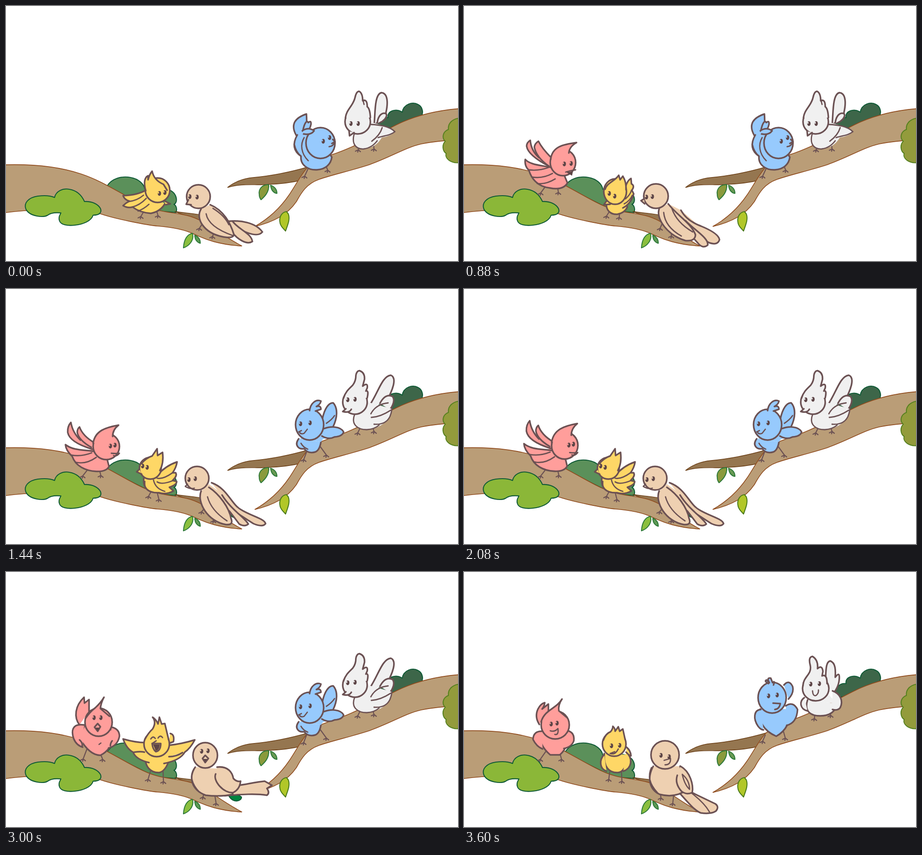
An HTML page that plays this animation: 996 by 562 pixels, repeating every 3.72 s.

```html
<!DOCTYPE html>
<html lang="en">
<head>
<meta charset="utf-8">
<title>Birds on a branch</title>
<style>
html,body{margin:0;width:100%;height:100%;overflow:hidden;background:#fff}
svg{display:block;width:100vw;height:100vh}
.bird{stroke:#6b5153;stroke-width:3.5;stroke-linecap:round;stroke-linejoin:round}
.bird .line{fill:none}
.bird .leg{fill:none;stroke-width:2.3}
.bird .dark{fill:#5d4547;stroke:none}
.bird .flat{stroke:none}
.bird .thin{stroke-width:2.8}
.wood{fill:#ba9d77;stroke:#8f4a1c;stroke-width:1.6}
.shade{fill:#957650;stroke:#6b3f17;stroke-width:1.4}
.leaf{stroke:#0f5a36;stroke-width:2.1;stroke-linejoin:round}
</style>
</head>
<body>
<svg id="stage" viewBox="0 0 996 562">
  <g class="leaf">
    <path fill="#5b905a" d="M222 398C232 380 255 374 275 378C292 381 304 392 306 404C330 396 362 400 372 415C378 425 376 435 370 437C376 440 377 448 375 455L330 452Z"/>
    <path fill="#3d6649" d="M815 275C820 252 828 244 842 246C838 232 860 224 873 234C876 216 896 210 908 217C919 223 920 236 915 244L860 275Z"/>
    <path fill="#00843f" d="M490 491C500 488 512 490 519 496C519 503 510 506 503 504Q494 501 490 491Z"/>
  </g>
  <path class="shade" d="M372 453C400 457 430 458 450 466Q470 474 482 486Q440 480 412 468Z"/>
  <path class="shade" d="M668 354C630 365 590 374 545 378C520 380 500 390 488 400C520 390 550 396 580 393C610 392 635 388 655 383Z"/>
  <path class="wood" d="M-5 350C60 348 120 355 165 370S240 406 290 432S360 452 400 462S465 500 520 529C470 526 440 515 415 503S360 487 335 485S240 469 208 458C150 450 60 446 -5 456Z"/>
  <path class="wood" d="M1000 226C950 230 900 242 860 262S770 310 720 327S680 345 664 356C650 372 638 395 624 416C605 444 580 468 548 486C590 476 620 460 640 431C651 411 662 392 690 382C715 373 760 363 800 350C850 332 880 312 915 304C945 298 975 296 1000 295Z"/>
  <g class="leaf">
    <path fill="#8bb738" d="M107 422C110 408 125 401 140 404C158 407 168 420 173 431C190 430 203 437 208 446C212 455 206 461 192 461C188 474 170 481 152 483C135 485 121 482 118 474C115 466 118 462 121 456C110 455 98 456 92 461C82 467 52 464 44 448C38 434 50 422 70 419C85 417 98 418 107 422Z"/>
    <path fill="#939b3c" stroke="#56801f" d="M1000 247C985 248 973 258 975 272C962 277 960 291 968 298C960 306 962 320 970 325C966 335 980 348 1000 345Z"/>
    <path fill="#8a9a3c" stroke="#2f7a3a" d="M579 394C565 393 556 403 558 415Q558 422 562 427C570 420 580 410 579 394Z"/>
    <path fill="#6b9b55" stroke="#2f7a3a" d="M583 395Q597 400 597 413Q585 411 583 395Z"/>
    <path fill="#b1c728" stroke="#4b7a1c" d="M618 453C606 455 601 467 604 479C606 487 612 491 616 496C620 484 627 470 622 458Z"/>
    <path fill="#8bbf3f" stroke="#2f7a3a" d="M411 501C399 503 392 515 391 533C403 529 415 517 411 501Z"/>
    <path fill="#5f9a55" stroke="#2f7a3a" d="M416 505Q429 511 428 523Q416 519 416 505Z"/>
  </g>
</svg>
<script>
// Pose parts: l leg, b filled outline, f flat fill, s line, k dark, h head, e eye, c closed eye
const birds = [
  { fill: '#f0f0f0', foot: 316,
    keys: [[1160, 1240, 1], [3160, 3360, 2]],
    poses: [
`l779 312 776 317|l810 306 811 315
bM811 262C814 240 811 195 827 191C842 192 842 215 837 236C833 246 822 256 811 262
bM818 258C820 240 830 233 838 238C841 245 832 254 822 258
fM768 276C758 300 768 316 788 315Q815 313 828 290Q848 287 857 277Q840 264 803 256Z
sM769 277C760 300 768 316 788 315Q806 313 818 297
sM803 261C825 262 845 265 857 277C845 286 835 285 820 290M829 268Q824 285 806 298
h775 255 28 27
bM748 246C750 228 765 220 769 202Q772 188 778 188Q786 192 786 209Q796 204 796 222Q802 226 803 246
sM787 209L789 217
bM756 276L757 286L767 279|e760 259|e776 259`,
`l780 307 775 317|l808 305 811 314
bM800 258C820 230 828 192 848 190C862 196 853 222 836 252
bM824 252Q836 229 852 237Q859 248 846 266
fM768 277C760 298 774 310 795 310C825 309 850 286 850 264L800 250Z
sM768 277C760 298 774 310 795 310Q812 309 822 300
sM811 298Q837 300 846 281Q851 268 850 262
sM805 283Q825 282 848 267M804 275Q815 254 842 251
h769 249 27 27
bM744 240C748 226 757 219 764 212Q771 203 771 190Q773 180 779 180Q791 184 790 199L786 214Q798 205 796 218L793 225Q800 222 796 240
bM749 264L742 270Q756 274 761 265|e753 244|e769 243`,
`l773 315 772 323|l807 311 808 316
bM796 245C798 220 796 198 807 196C819 200 819 217 818 232Q828 218 827 235Q826 252 815 266
fM757 282L800 266L821 290Z
bM757 282C750 304 760 317 785 317C805 317 820 308 821 290
bM750 277C738 284 740 303 757 306
bM812 262C830 268 836 285 829 299Q824 306 812 303
h775 257 29 27
bM747 250C748 230 767 226 763 206Q758 187 768 186Q781 194 779 213Q789 204 791 219L789 229Q800 224 800 246
sM768 262Q769 275 776 272Q782 267 781 260|e764 247|e783 246`] },

  { fill: '#97cafd', foot: 366,
    keys: [[960, 1120, 1], [3040, 3200, 2]],
    poses: [
`l665 360 658 375|l704 350 709 362
bM640 286C628 265 632 248 662 238C663 252 664 268 654 287
bM642 284C630 305 634 320 650 331C648 350 665 362 685 361C705 360 716 348 718 333L680 282
sM657 290C648 305 650 325 666 341M636 307Q639 321 650 331
h693 302 32 34
bM654 276C658 254 664 252 666 257Q673 251 672 261Q670 272 660 281
bM653 275Q666 266 679 275Q672 285 656 282
bM720 294L725 299L718 303|sM712 310Q721 309 723 302|e699 298|e713 290`,
`l662 360 656 376|l693 348 706 366
fM697 287L721 300L712 325L690 335Z
bM697 287C702 262 712 250 721 251C732 263 730 284 721 303
bM645 330C634 345 646 354 657 352Q666 364 682 359Q691 355 694 337
fM645 330L694 337L706 320Z
bM700 308C715 302 737 302 744 315Q741 325 724 326Q711 333 696 324
sM706 296Q718 288 724 279M650 340Q655 349 665 353
h669 299 31 34
bM669 268C671 251 684 242 694 247Q693 254 684 259Q694 256 694 265L682 269
sM647 316Q650 321 657 318L664 309M645 315L651 312|e649 297|e670 295`,
`l664 359 658 373|l703 348 708 366
bM705 249Q716 236 724 252Q728 266 715 280
bM653 302C646 326 660 350 688 362C708 351 720 332 718 302
bM654 303C638 304 637 324 648 340Q654 348 660 348
bM709 295Q725 284 735 303C734 320 728 334 711 338
h679 277 31 34
bM671 246Q660 240 667 238L673 244Q666 232 676 234L680 244Q686 238 682 249
bM681 289L697 290Q695 302 685 303|e671 273|e690 271`] },

  { fill: '#eed0b1', foot: 504,
    keys: [[40, 360, 1], [680, 840, 2], [1040, 1240, 3], [2680, 2960, 4], [3160, 3400, 5]],
    poses: [
`l432 481 426 490|l459 498 455 508
fM480 470L520 476L535 500L498 498Z
bM487 475C515 471 550 477 565 498C557 508 538 504 515 492
bM499 474C510 491 541 501 543 519C530 528 508 512 498 498
bM430 447C416 470 438 500 475 508Q502 514 502 503C495 480 480 450 450 438
sM441 458Q446 487 500 506M456 446Q482 462 491 482
h424 420 26 26|bM402 427L397 437L408 438|e405 420|e421 421`,
`l435 482 431 490|l456 496 457 507
fM490 475L530 495L530 520L502 502Z
bM496 478C518 484 552 505 558 518Q553 526 541 522Q538 515 522 502
bM506 484C527 500 542 520 539 531Q529 540 519 528L504 502
bM430 446C421 470 450 506 490 517Q510 516 506 504C502 482 478 450 450 432
sM442 461Q447 490 482 506M464 441Q491 459 499 486
h422 419 27 27|bM397 425L389 429L396 437|e401 419|e414 419`,
`l436 481 432 490|l457 495 457 507
fM478 450L515 482L530 515L500 500L450 436Z
bM478 450Q490 473 522 485Q561 501 563 515Q559 528 541 522L500 500
bM488 473C508 494 540 512 537 527Q526 536 515 522L496 501
bM430 447C422 470 450 506 488 517Q510 519 510 504C500 478 470 462 450 436
sM440 455Q443 487 479 507M458 446Q468 477 504 498
h423 419 27 27|bM397 425L390 429L398 436|e402 421|e415 420`,
`l436 485 431 491|l460 499 457 511
fM447 430L490 462L535 510L520 512L492 489L470 500L430 445Z
bM453 427C489 440 496 475 519 487C540 500 569 506 572 517Q566 526 545 517L500 488
bM476 454C494 484 527 505 534 518Q526 525 514 518L492 489
bM430 445C420 470 444 512 484 519Q502 521 496 506C492 482 470 452 447 437
sM444 458Q452 488 487 511
h421 417 26 26|sM400 430L395 435Q406 442 415 439|e403 420|e417 418`,
`l437 485 434 496|l460 491 463 510
bM492 473C522 470 548 463 570 461L586 470L575 477Q582 487 575 492C550 488 520 490 482 493
bM417 430C402 452 408 480 440 492Q472 496 500 490L475 434
sM414 434Q400 457 426 485
bM465 430C490 427 499 443 501 455Q508 463 517 461Q515 479 501 486C480 489 455 460 462 445
h439 404 27 28|bM433 411L439 404L446 411L439 420Z|kM435 412H444L439 418Z|e431 395|e445 394`,
`l433 489 434 498|l462 491 460 510
bM474 486C492 506 508 526 522 531Q544 534 555 527Q563 518 554 511L500 485
sM501 487Q529 508 541 529
bM417 428C402 456 410 480 431 490Q466 499 491 480L476 428
sM413 431Q400 458 426 486
bM477 428C499 440 506 470 503 486Q490 492 479 483Q464 466 470 448
sM481 446Q497 459 497 479Q486 469 481 446
h443 403 31 31|sM441 415L455 411Q456 425 443 425|e434 404|e452 407`] },

  { fill: '#fed766', foot: 463,
    keys: [[720, 840, 1], [920, 1080, 2], [2720, 2960, 3], [3080, 3280, 4]],
    poses: [
`l303 454 297 464|l332 452 335 462
bM310 405Q290 417 258 418Q261 427 272 430Q264 434 258 440Q268 446 279 443Q294 455 319 457Q340 453 350 436
sM270 431Q289 429 303 417M278 443Q295 439 309 424M291 452Q304 447 315 437
h334 406 27 27
bM308 407C303 390 305 378 313 374L313 383Q316 371 322 364Q326 384 347 393L355 406
bM348 429L362 436L352 438|e338 413|e350 411`,
`l319 455 314 463|l343 454 342 466
bM314 434C312 452 325 460 338 459Q354 456 360 443L350 420
bM353 412Q357 386 368 380L369 392Q377 396 370 406L374 414Q367 437 350 445
sM356 425Q367 415 369 406M353 436Q365 430 371 417
h333 409 25 28
bM311 404C314 390 333 386 341 373L344 383L350 375Q358 388 357 405
bM314 430L308 438L322 437|e320 413|e332 419`,
`l320 446 314 457|l333 448 337 464
bM304 414C300 438 313 450 337 449Q353 454 369 445L360 437Q377 431 376 424L367 422Q378 412 374 405L367 405Q375 394 377 381Q351 390 334 410
sM325 421Q329 440 350 446M333 417Q346 420 367 405M333 425Q343 432 366 423M306 424Q304 441 317 446
h318 395 24 24
bM297 386Q309 372 322 368L333 352L334 367L345 360Q348 384 339 400
bM294 397L288 403L299 408|e301 390|e311 393`,
`l318 440 313 457|l346 438 347 462
bM362 356Q372 358 369 374L358 378
bM307 400C304 431 320 443 338 442Q355 438 363 401
bM307 376Q286 376 258 368Q266 390 280 397Q286 413 315 420M283 397Q297 395 305 397
bM358 382Q387 379 416 370Q406 389 394 397Q384 415 348 422M359 407Q375 407 389 398
h332 379 28 28
bM306 369Q314 354 323 346Q332 331 323 320Q331 325 335 335L338 320L343 335L350 334L358 368
bM322 378H341Q341 394 330 396Q323 390 322 378Z|kM324 380H339Q338 393 330 394Z|sM322 378L331 372|c324 365|c340 363`,
`l321 441 319 457|l347 440 348 461
bM358 386Q367 393 368 405L357 408
bM309 400C307 430 320 443 339 442Q355 442 364 403
bM309 402C297 415 299 434 314 439
bM357 397C373 410 370 433 351 439
h331 379 26 27
bM307 371Q312 356 323 352Q328 346 328 340Q333 344 333 351L340 341L343 351L350 346L355 369
sM322 400Q333 404 340 390M322 400L332 396|e325 383|e343 382`] },

  { fill: '#ff9e9b', foot: 414,
    keys: [[640, 800, 1], [960, 1120, 2], [2440, 2600, 3], [2800, 2960, 4], [3000, 3120, 5]],
    poses: [
`l182 396 165 411|l206 397 206 408
fM184 354L166 328L215 350L205 385L160 364Z
bM184 354C160 346 135 318 140 298Q142 287 150 280Q160 300 166 320Q184 335 196 358
bM168 325Q165 308 174 296Q186 318 197 350
bM203 355C170 362 150 358 132 352Q134 362 147 368Q138 372 140 376C150 392 175 402 197 401C220 400 238 385 240 366
sM139 371Q165 378 194 362M152 390Q174 391 199 370M220 391Q236 386 241 372
h228 342 29 29
bM202 329C205 305 220 294 236 285C230 298 228 306 229 318
bM239 345Q252 343 256 335L257 347Q252 354 238 352L250 348|c220 334|c239 329`,
`l180 397 169 412|l206 398 208 411
fM187 353L165 325L205 340L210 385L150 362Z
bM187 353Q141 329 138 309Q138 301 146 296Q148 319 165 334
bM187 353Q159 333 155 311Q156 303 164 298Q172 314 192 334
bM193 356C170 351 145 350 135 338Q133 353 143 362C148 379 161 398 189 401Q218 407 228 390L218 366
sM142 361Q164 364 186 356M150 377Q173 381 195 369M161 391Q180 394 201 381
h218 345 28 29
bM191 338C194 310 218 305 248 301Q232 310 231 324
sM224 366Q234 363 246 361|kM225 366L240 365L238 374Z|e221 348|e236 347`,
`l180 398 169 412|l206 399 209 411
fM190 353L165 325L205 340L210 385L155 362Z
bM190 353Q140 338 136 316Q135 303 143 294Q147 317 164 333
bM188 349Q160 333 157 316Q157 308 162 304Q169 324 195 339
bM196 358C174 354 149 357 131 343Q132 356 146 369C153 390 175 401 199 402Q221 403 227 391L222 372
sM144 366Q166 370 189 361M155 382Q176 387 199 371
h221 347 29 29
bM192 340C196 312 220 305 248 300Q235 310 235 325
sM232 362Q242 363 250 362Q244 370 237 367|e230 346|e240 344`,
`l180 394 167 414|l208 394 213 412
fM180 350L173 318L200 335L215 390L160 355Z
bM180 350Q148 338 150 312Q153 294 165 286Q172 306 173 329
bM177 343Q166 308 180 295Q187 307 190 331
bM190 349C168 343 142 347 130 367Q140 362 146 365C158 382 182 397 209 398Q231 396 240 383L226 360
sM146 363Q165 367 183 352M157 371Q176 377 191 367
bM221 375Q237 369 241 382Q240 393 232 399Q233 389 225 388
h211 343 29 30
bM184 334C188 308 211 294 235 287Q218 302 219 322
bM214 356L226 364L216 371L209 365|kM211 363L224 364L215 369Z|e207 345|e222 342`,
`l178 391 170 412|l208 400 213 413
bM162 337C149 320 152 295 172 276L173 289L183 281L183 307
bM172 340L162 366Q184 404 208 404Q231 393 240 360L228 340
bM172 337C144 333 144 352 149 367Q155 382 169 386M162 370Q169 376 168 383
bM233 342Q250 346 250 362Q246 383 226 388M234 372Q230 377 230 383
sM205 380L209 377
h204 331 30 31
bM175 323Q184 309 197 299Q209 288 216 276Q209 289 208 301L228 318
bM195 342L202 334L208 341L202 351Z|kM197 343H206L202 350Z|e194 321|e209 321`,
`l182 393 168 413|l211 398 215 413
bM166 336Q155 319 163 302Q169 290 178 288Q177 296 172 302L186 291L186 306
bM168 353Q163 380 190 403H211Q228 389 232 358
bM172 351Q153 350 152 369Q160 385 173 390
bM229 350Q244 354 242 372Q237 386 220 389
h201 337 31 31
bM170 330C178 303 203 302 216 280Q207 293 209 306L227 321
sM190 350Q200 353 207 345Q209 360 200 358|e192 335|e205 333`] }
];

const pinkNods = [[1480, 2, -2], [1640, 1, -1], [1680, 0, 0], [2080, 1, -2], [2120, 2, -3], [2400, 0, 0]];
const LOOP = 3720, STEP = 40;
const stage = document.getElementById('stage');
const nums = s => s.trim().split(/[ ,]+/).map(Number);
const path = (cls, d, fill = '') => `<path class="${cls}" d="${d}"${fill && ` fill="${fill}"`}/>`;
const oval = (cls, x, y, rx, ry, fill = '') =>
  `<ellipse class="${cls}" cx="${x}" cy="${y}" rx="${rx}" ry="${ry}"${fill && ` fill="${fill}"`}/>`;

function part(token, fill) {
  const kind = token[0], d = token.slice(1), n = nums(d);
  switch (kind) {
    case 'b': return path('', d, fill);
    case 'f': return path('flat', d, fill);
    case 's': return path('line thin', d);
    case 'k': return path('dark', d);
    case 'h': return oval('', ...n, fill);
    case 'e': return oval('dark', n[0], n[1], 3.7, 5.3) + oval('flat', n[0] - 2.2, n[1] - 1.5, 1.5, 1.9, fill);
    case 'c': return path('line thin', `M${n[0] - 5} ${n[1] + 3}q5 -8 10 -1`);
    case 'l': return path('leg', `M${n[0]} ${n[1]}L${n[2]} ${n[3]}m-6 3l6 -3l5 4m-5 -4l-1 5`);
  }
}

function makePose(text, bird) {
  const tokens = text.split(/[|\n]/);
  const node = document.createElementNS('http://www.w3.org/2000/svg', 'g');
  node.setAttribute('class', 'bird');
  node.innerHTML = tokens.map(t => part(t, bird.fill)).join('');
  stage.append(node);
  return { node, head: nums(tokens.find(t => t[0] === 'h').slice(1)) };
}

const pink = birds[birds.length - 1];
const blink = pink.poses.push(pink.poses[2].replace(/\|e/g, '|c')) - 1;
birds.forEach(b => { b.poses = b.poses.map(p => makePose(p, b)); });

const ease = u => u * u * (3 - 2 * u);

// Lean a pose over its planted feet until the head reaches (x, y).
function lean({ head }, foot, x, y) {
  const h = head[1] - foot, k = (x - head[0]) / h, s = (y - foot) / h;
  return `matrix(1 0 ${k} ${s} ${-k * foot} ${foot * (1 - s)})`;
}

function drawBird(bird, t) {
  let now = 0, x = bird.poses[0].head[0], y = bird.poses[0].head[1];
  for (const [start, end, next] of bird.keys) {
    if (t < start) break;
    const u = ease(Math.min(1, (t - start) / (end - start)));
    const a = bird.poses[now].head, b = bird.poses[next].head;
    x = a[0] + (b[0] - a[0]) * u;
    y = a[1] + (b[1] - a[1]) * u;
    if (u >= 0.5) now = next;
    if (u < 1) break;
  }
  let move = '';
  if (bird === pink) {
    if (t < 40) now = -1;
    else if (t < 440) {
      const v = 1 - (t - 40) / 400;
      move = `translate(${-225 * v} ${-119 * Math.sin(v * Math.PI / 2)}) `;
      y += Math.sin(t / 40 * Math.PI / 2) * 5;
    }
    const nod = pinkNods.filter(n => n[0] <= t).pop();
    if (nod && t < 2400) { x += nod[1]; y += nod[2]; }
    if (t >= 1840 && t < 2080) now = blink;
  }
  bird.poses.forEach((p, i) => {
    p.node.style.display = i === now ? '' : 'none';
    if (i === now) p.node.setAttribute('transform', move + lean(p, bird.foot, x, y));
  });
}

const began = performance.now();
function frame() {
  const t = Math.floor((performance.now() - began) % LOOP / STEP) * STEP;
  birds.forEach(b => drawBird(b, t));
  requestAnimationFrame(frame);
}
frame();
</script>
</body>
</html>
```
